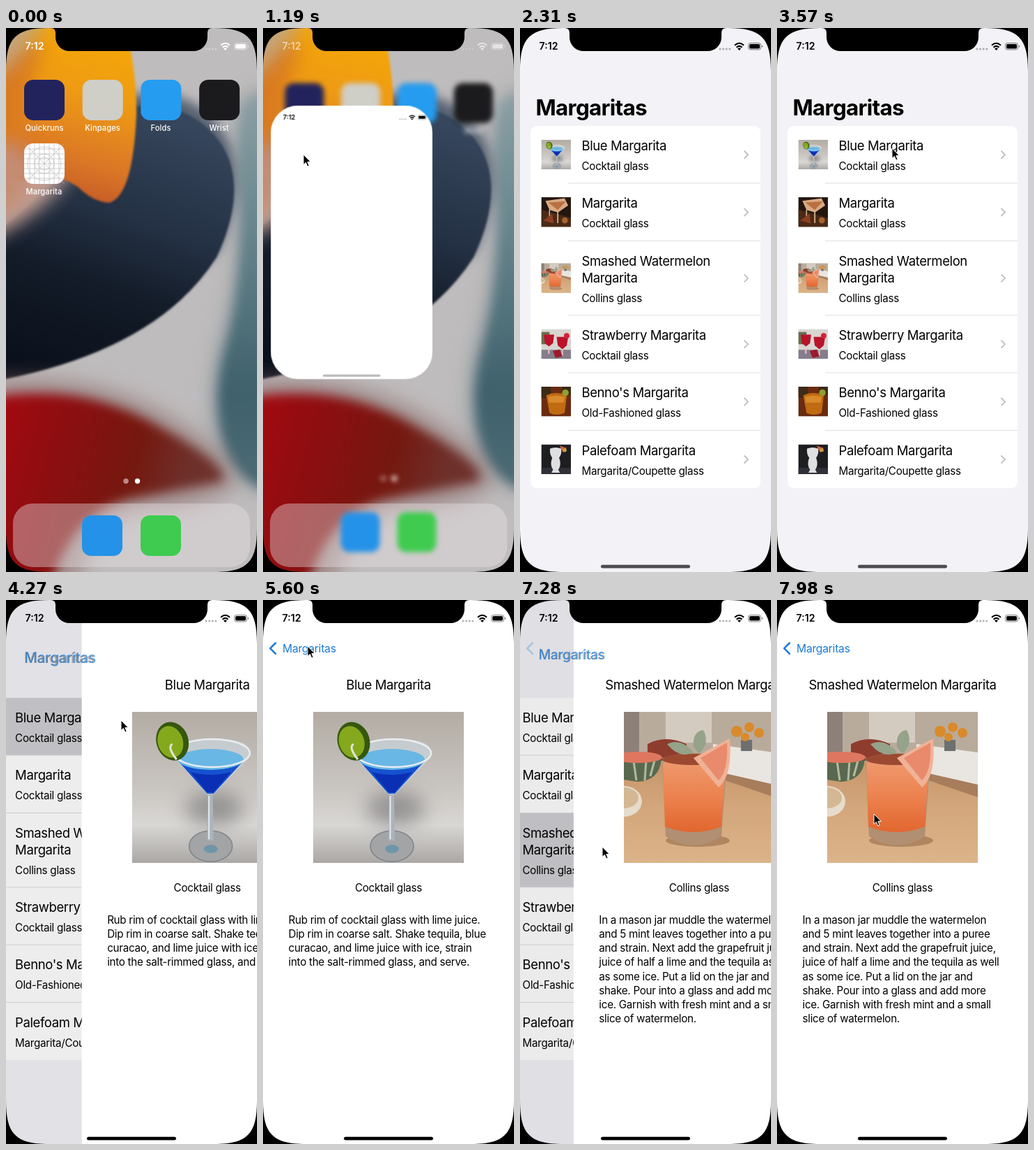
An HTML page for the animation above (8 s loop, 360x778 px).

```html
<!DOCTYPE html>
<html lang="en">
<head>
<meta charset="utf-8">
<title>Cocktail list</title>
<style>
html, body { margin: 0; width: 100%; height: 100%; overflow: hidden; background: #000; }
svg { display: block; width: 360px; height: 778px; }
text { font-family: Inter, "Open Sans", sans-serif; white-space: pre; }
.label { font-size: 11.1px; font-weight: 500; fill: #fff; letter-spacing: .1px; text-anchor: middle; }
.time { font-size: 14.2px; font-weight: 600; }
.big { font-size: 31.4px; font-weight: 700; letter-spacing: -.7px; }
.head { font-size: 18.5px; letter-spacing: -.4px; }
.body { font-size: 15.2px; letter-spacing: -.28px; }
.back { font-size: 15.7px; letter-spacing: -.25px; fill: #1a7bd8; }
.mid { text-anchor: middle; }
.b2 { filter: blur(1.6px); }
.b8 { filter: blur(8px); }
.b14 { filter: blur(14px); }
</style>
</head>
<body>
<svg id="stage" viewBox="0 0 360 778"></svg>
<script>
const drinks = [
  { name: ["Blue Margarita"], glass: "Cocktail glass", y: 140, end: 222,
    steps: ["Rub rim of cocktail glass with lime juice.", "Dip rim in coarse salt. Shake tequila, blue",
      "curacao, and lime juice with ice, strain", "into the salt-rimmed glass, and serve."] },
  { name: ["Margarita"], glass: "Cocktail glass", y: 222, end: 304.5 },
  { name: ["Smashed Watermelon", "Margarita"], glass: "Collins glass", y: 304.5, end: 410.8,
    steps: ["In a mason jar muddle the watermelon", "and 5 mint leaves together into a puree",
      "and strain. Next add the grapefruit juice,", "juice of half a lime and the tequila as well",
      "as some ice. Put a lid on the jar and", "shake. Pour into a glass and add more",
      "ice. Garnish with fresh mint and a small", "slice of watermelon."] },
  { name: ["Strawberry Margarita"], glass: "Cocktail glass", y: 410.8, end: 493 },
  { name: ["Benno's Margarita"], glass: "Old-Fashioned glass", y: 493, end: 575.5 },
  { name: ["Palefoam Margarita"], glass: "Margarita/Coupette glass", y: 575.5, end: 658 }
];

// Simplified pictures on a 216 x 216 square
const photos = [
  `<rect width="216" height="216" fill="url(#grey)"/>
   <ellipse cx="118" cy="138" rx="42" ry="24" fill="#6b6a6c" opacity=".6" class="b14"/>
   <ellipse cx="113" cy="192" rx="31" ry="22" fill="#a3a4a6" stroke="#7f8488" stroke-width="1.5"/>
   <ellipse cx="113" cy="196" rx="10" ry="6" fill="#6f95a8"/>
   <path d="M109 116h7l1 68h-9z" fill="#a9b4bd"/><path d="M110.500 120v62" stroke="#e4e8ea" stroke-width="2"/>
   <path d="M61 62Q60 40 115 39T169 58Q168 66 160 74L117 118h-9L68 74Z" fill="#c9d3da" opacity=".75"/>
   <path d="M66 70Q112 92 160 70L117 117h-9Z" fill="#1552cf"/>
   <path d="M84 86Q112 94 142 86L117 115h-9Z" fill="#0a2fb4"/>
   <ellipse cx="113" cy="68" rx="47" ry="15" fill="#69b7e4"/>
   <ellipse cx="115" cy="59" rx="54" ry="20" fill="none" stroke="#e9edf0" stroke-width="2.500"/>
   <g transform="rotate(-18 58 42)"><ellipse cx="58" cy="42" rx="23" ry="28" fill="#35570f"/>
   <ellipse cx="55" cy="42" rx="18" ry="23" fill="#85a91d"/></g>
   <path d="M64 68Q50 50 58 46" stroke="#dfe6d4" stroke-width="3" fill="none"/>`,
  `<rect width="216" height="216" fill="#24160f"/><path d="M0 90L216 150V216H0Z" fill="#4a2a16"/>
   <path d="M30 26L170 8L196 60L122 110L60 92Z" fill="#d9a983"/><path d="M52 38L180 30L120 92Z" fill="#b9713f"/>
   <path d="M116 100h9v88h-9zM56 90h8v80h-8z" fill="#d8b48c"/><circle cx="172" cy="168" r="22" fill="#a4632a"/>
   <path d="M14 170L80 120L92 190Z" fill="#8a3f22"/>`,
  `<rect width="216" height="216" fill="url(#wood)"/><rect width="216" height="72" fill="#b9ab9b"/>
   <path d="M0 0h22v58H0z" fill="#8d8078"/><path d="M60 0h66v44H60z" fill="#d4cbc0"/>
   <path d="M34 46Q60 32 90 46V70H34Z" fill="#8e3c2e"/>
   <path d="M128 46L216 58V108L128 84Z" fill="#e9e5e0"/><path d="M128 84L216 104V122L128 92Z" fill="#a77d5c"/>
   <path d="M168 40h16v16h-16z" fill="#6d6f70"/>
   <g fill="#d98a2b"><circle cx="162" cy="28" r="8"/><circle cx="180" cy="22" r="7"/><circle cx="194" cy="30" r="7"/><circle cx="174" cy="36" r="6"/></g>
   <path d="M0 66H54Q52 98 20 100L0 97Z" fill="#59684f"/><path d="M14 70l4 28M32 70l-2 28M44 70l-6 22" stroke="#b4bc9d" stroke-width="3"/>
   <ellipse cx="20" cy="65" rx="35" ry="8" fill="#df7760"/>
   <ellipse cx="0" cy="128" rx="26" ry="22" fill="#e6dccb"/><ellipse cx="0" cy="123" rx="21" ry="15" fill="#d3b893"/>
   <ellipse cx="106" cy="184" rx="46" ry="9" fill="#976b49" opacity=".6"/>
   <path d="M55 66Q100 52 148 66L140 178Q100 204 60 178Z" fill="#b18f72"/>
   <path d="M56 72Q102 62 146 72L140 164Q100 180 59 164Z" fill="url(#juice)"/>
   <ellipse cx="101" cy="68" rx="46" ry="8" fill="#9b4a31"/>
   <path d="M152 38Q156 92 136 108L100 66Z" fill="#f0b296"/><path d="M148 44Q150 84 136 98L110 66Z" fill="#e98a6c"/>
   <path d="M62 46Q82 36 100 58Q80 68 62 46ZM100 50Q98 28 114 26Q124 44 108 60Z" fill="#94a38a"/>`,
  `<rect width="216" height="216" fill="#d9d5d0"/><path d="M0 150H216V216H0Z" fill="#857c8c"/><path d="M0 20h60v90H0z" fill="#66714f"/>
   <path d="M18 40h76l-8 62-30 24-30-24zM112 56h84l-10 62-32 28-34-28z" fill="#b9142a"/>
   <path d="M50 124h10v56H50zM148 144h10v50h-10z" fill="#e7c5ca"/><path d="M84 158l50-10 20 50-50 10z" fill="#9c1a2b"/>
   <circle cx="185" cy="48" r="20" fill="#d3233a"/>`,
  `<rect width="216" height="216" fill="#6a2b10"/><path d="M0 0h70v80H0zM150 0h66v60h-66z" fill="#3d2a17"/>
   <path d="M36 62Q110 30 186 62L170 190Q110 216 60 190Z" fill="#c06a13"/><path d="M50 74Q110 56 172 74L164 116H56Z" fill="#d88a2a"/>
   <circle cx="176" cy="44" r="24" fill="#90a02c"/>`,
  `<rect width="216" height="216" fill="#1e1e22"/><path d="M0 170H216V216H0Z" fill="#303038"/>
   <path d="M64 30Q104 14 146 30Q150 74 130 96Q150 150 124 184L136 206H74L86 184Q60 150 80 96Q60 74 64 30Z" fill="#dedfe0"/>
   <path d="M134 10L184 26L160 60Z" fill="#d1683c"/><circle cx="172" cy="42" r="13" fill="#c9a03a"/>`
];

const text = (x, y, cls, s, extra = "") => `<text x="${x}" y="${y}" class="${cls}" ${extra}>${s}</text>`;
const photo = (i, x, y, size) =>
  `<svg x="${x}" y="${y}" width="${size}" height="${size}" viewBox="0 0 216 216">${photos[i]}</svg>`;
const tile = (x, y, fill) => `<rect x="${x}" y="${y}" width="58" height="58" rx="13" fill="${fill}"/>`;

const status = (id, color, dots) => `<g id="${id}" fill="${color}" stroke="none">
  ${text(27.5, 31.3, "time", "7:12")}
  <g opacity="${dots}">${[287, 291.6, 296.2, 300.8].map(x => `<circle cx="${x}" cy="30" r="1.500"/>`).join("")}</g>
  <g fill="none" stroke="${color}" stroke-width="2"><path d="M308 24.800q6.500-6 13 0M310.500 27.700q4-3.600 8 0"/></g>
  <path d="M312 29.500q2.500-2 5 0l-2.500 2.600z"/>
  <rect x="327.500" y="21.500" width="18" height="9.500" rx="3" fill="none" stroke="${color}" opacity=".5"/>
  <rect x="329" y="23" width="15" height="6.500" rx="1.700"/><path d="M347 24.500q1.700 1.700 0 3.500z"/></g>`;

const row = (d, i) => {
  const mid = (d.y + d.end) / 2;
  const lines = d.name.map((s, k) => text(88.5, d.y + 35.4 + 24 * k, "head", s)).join("");
  return `<g id="thumb${i}">${photo(i, 30.5, mid - 21.2, 42.5)}</g>${lines}
    ${text(88.5, d.end - 19.3, "body", d.glass)}
    <path d="M322 ${mid - 4.800}l5 5-5 5" fill="none" stroke="#c3c3c7" stroke-width="2" stroke-linecap="round" stroke-linejoin="round"/>
    ${i < 5 ? `<path d="M69 ${d.end}H345" stroke="#dedee1"/>` : ""}`;
};

const detail = i => `<g id="detail${i}">${text(180, 127.6, "head mid", drinks[i].name.join(" "))}
  ${photo(i, 72, 160, 216)}${text(180, 417.3, "body mid", drinks[i].glass)}
  ${drinks[i].steps.map((s, k) => text(36.5, 462.7 + 20.2 * k, "body", s)).join("")}</g>`;

const gridLines = [8, 15, 22, 29, 36, 43, 50].map(v => `M${v} 0V58M0 ${v}H58`).join("");
const gradient = (id, dir, stops) => `<linearGradient id="${id}" ${dir}>${stops.map(([o, c]) =>
  `<stop offset="${o}" stop-color="${c}"/>`).join("")}</linearGradient>`;
const down = 'x2="0" y2="1"';

stage.innerHTML = `<defs>
  ${gradient("grey", down, [[0, "#b3aca4"], [.5, "#c9c5c1"], [.75, "#d9d7d4"], [1, "#aaa7a5"]])}
  ${gradient("wood", down, [[.3, "#c49468"], [.65, "#d4a77c"], [1, "#dcb48a"]])}
  ${gradient("juice", down, [[0, "#ee9a70"], [.5, "#ec8350"], [1, "#e2662f"]])}
  ${gradient("amber", 'x1=".6" y1="0" x2=".4" y2="1"', [[0, "#f6aa04"], [.4, "#ee9a14"], [.75, "#da7626"], [1, "#bf5526"]])}
  ${gradient("navy", 'x1=".6" y1="0" x2=".3" y2="1"', [[0, "#36465c"], [.4, "#233043"], [.65, "#131b28"], [1, "#0a101b"]])}
  ${gradient("red", 'x2=".9" y2=".2"', [[0, "#a8080f"], [.4, "#8c0e10"], [.75, "#74180f"], [1, "#6e302b"]])}
  ${gradient("teal", down, [[0, "#8ba0a5"], [.35, "#66848c"], [.75, "#3f616c"], [1, "#4c6b75"]])}
  <clipPath id="window"><rect id="pane"/></clipPath>
  <clipPath id="cardShape"><rect x="15" y="140" width="330" height="518" rx="9"/></clipPath></defs>
<rect width="360" height="778" fill="#bfbcbd"/>
<path class="b14" d="M390 80L336 100Q322 180 330 260Q330 370 304 450Q282 530 303 600Q322 655 390 672Z" fill="#7d8f94" opacity=".6"/>
<path class="b8" d="M375 90L342 110Q328 180 337 260Q338 370 316 450Q292 530 314 600Q330 645 375 662Z" fill="url(#teal)"/>
<path class="b8" d="M170 98Q275 78 318 160Q346 225 304 320L200 410L-20 480V270Z" fill="#566070"/>
<path class="b2" d="M185 112Q266 104 310 168Q348 230 302 328Q218 460 -10 504V290Q60 230 185 112Z" fill="url(#navy)"/>
<path class="b14" d="M-30 120L100 190Q75 255 -30 305Z" fill="#c3a298"/>
<path class="b2" d="M-20 -20H168Q188 60 187 125Q182 240 148 250Q124 248 104 228Q70 204 30 218L-20 210Z" fill="url(#amber)"/>
<path class="b14" d="M-30 140Q20 160 48 200Q30 260 -30 280Z" fill="#c48d73"/>
<path class="b14" d="M-40 20L55 20Q34 70 20 150L-40 170Z" fill="#d87a20"/>
<path class="b14" d="M-40 -40H70Q44 20 -10 68L-40 70Z" fill="#c3a57e"/>
<path class="b14" d="M-40 505Q120 485 235 555Q335 612 330 655Q270 692 200 690Q130 700 100 800H-40Z" fill="#8f6e6d" opacity=".6"/>
<path class="b8" d="M-30 530Q110 503 225 573Q320 625 310 648Q245 662 175 674Q110 690 78 760L60 800H-30Z" fill="url(#red)"/>
<rect x="10" y="680" width="340" height="91" rx="28" fill="#e8e2e4" opacity=".4"/>
<g id="home">
  ${[["#22235c", "Quickruns"], ["#cfcec7", "Kinpages"], ["#259cf0", "Folds"], ["#1b1b1d", "Wrist"]].map(([c, s], i) =>
    tile(26 + 83.7 * i, 74, c) + text(55 + 83.5 * i, 147.3, "label", s)).join("")}
  ${tile(26, 165, "#fff")}<g transform="translate(26 165)" fill="none" stroke="#b4b4b6" stroke-width=".6">
    <path d="${gridLines}M0 0L58 58M58 0L0 58"/>${[9, 14, 24].map(r => `<circle cx="29" cy="29" r="${r}"/>`).join("")}</g>
  ${text(54.5, 238.4, "label", "Margarita")}
  <circle cx="172" cy="648" r="3.700" fill="#fff" opacity=".5"/><circle cx="188.500" cy="648" r="3.700" fill="#fff"/>
  ${tile(109, 697, "#2492e8")}${tile(193, 697, "#3fcb4f")}
</g>
${status("homeStatus", "#fff", .3)}
<g id="app" clip-path="url(#window)">
  <rect width="360" height="778" fill="#fff"/>
  <g id="content">
    <g id="list"><rect width="360" height="778" fill="#f2f2f7"/>
      <g clip-path="url(#cardShape)"><rect y="140" width="360" height="518" fill="#fff"/><rect id="picked" width="360" fill="#cfcfd3"/></g>
      ${drinks.map(row).join("")}
      <rect id="dim" width="360" height="778"/></g>
    <g id="page"><rect width="360" height="778" fill="#fff"/>${detail(0)}${detail(2)}</g>
    <g id="title">${text(0, 0, "big", "Margaritas")}</g>
    <g id="back">${text(0, 0, "back", "Margaritas")}</g>
    <path id="arrow" d="M18 61.500L10.300 69.200L18 76.900" fill="none" stroke="#1a7bd8" stroke-width="2.500" stroke-linecap="round" stroke-linejoin="round"/>
  </g>
  ${status("appStatus", "#000", .3)}
  <rect id="bar" x="116" width="128" height="4.800" rx="2.400"/>
</g>
<path d="M0 0H360V778H0ZM62 0C14 0 0 14 0 62V716C0 764 14 778 62 778H298C346 778 360 764 360 716V62C360 14 346 0 298 0Z" fill-rule="evenodd"/>
<path d="M64 0Q71 0 71 7V13A20 20 0 0 0 91 33H269A20 20 0 0 0 289 13V7Q289 0 296 0Z"/>
<path id="cursor" d="M0 0V14.500L3.400 11.400L5.800 17L8.200 16L5.800 10.600H10.300Z" stroke="#fff" stroke-width="1"/>`;

const el = id => document.getElementById(id);
const set = (id, attrs) => { for (const k in attrs) el(id).setAttribute(k, attrs[k]); };
const clamp = v => Math.min(1, Math.max(0, v));
const lerp = (a, b, p) => a + (b - a) * p;

// Critically damped spring, time in ms
const spring = t => {
  const s = Math.max(0, t) * .017, p = 1 - (1 + s) * Math.exp(-s);
  return p > .992 ? 1 : p;
};

// [time, x, y]; an entry without a position hides the pointer
const path = [[0], [70, 298, 715], [770, 58, 181], [1820, 58, 181], [2290, 333, 6], [2300],
  [2800, 324, 241], [3570, 165, 172], [4970, 165, 172], [5600, 64, 66], [6090, 64, 66],
  [6370, 112, 260], [6720, 118, 353], [7870, 118, 353], [7980, 139, 306], [8000, 139, 306]];

function movePointer(t) {
  const i = path.findIndex(k => k[0] > t), a = path[i - 1], b = path[i];
  const shown = a.length > 1;
  set("cursor", { opacity: +shown });
  if (!shown || b.length < 2) return;
  const u = (t - a[0]) / (b[0] - a[0]), p = u * u * (3 - 2 * u);
  set("cursor", { transform: `translate(${lerp(a[1], b[1], p)} ${lerp(a[2], b[2], p)})` });
}

function openApp(t) {
  const q = spring(t - 1077), w = lerp(58, 360, q), h = lerp(58, 778, q ** 1.4), s = w / 360;
  const x = lerp(55, 180, q) - w / 2, y = lerp(194, 389, q) - h / 2;
  set("app", { transform: `translate(${x} ${y}) scale(${s})`, opacity: clamp(q * 5) });
  set("pane", { width: 360, height: h / s, rx: lerp(13, 44, q ** .3) / s });
  set("bar", { y: h / s - 10.2, fill: t < 1400 ? "#bbb" : t < 3990 ? "#4c4c4e" : "#000" });
  set("home", { transform: `translate(180 389) scale(${1 - .06 * q} ${1 - .026 * q}) translate(-180 -389)` });
  el("home").style.filter = q > 0 && q < 1 ? `blur(${7 * q}px)` : "none";
  set("homeStatus", { opacity: 1 - .7 * q });
  set("content", { opacity: clamp((t - 1540) / 140) });
  drinks.forEach((d, i) => set("thumb" + i, { opacity: +(t >= 1890 + 70 * i) }));
}

function navigate(t) {
  const p = t < 5950 ? spring(t - 4128) : t < 6950 ? 1 - spring(t - 5955) : spring(t - 7110);
  const second = t >= 6950, d = drinks[second ? 2 : 0];
  const pressed = t >= 3990 && t < 5950 || t >= 7000;
  set("list", { transform: `translate(${-108 * p})` });
  set("dim", { opacity: .1 * p });
  set("picked", { y: d.y, height: d.end - d.y, opacity: pressed ? 1 : p });
  set("page", { transform: `translate(${360 * (1 - p)})` });
  set("detail0", { opacity: +!second });
  set("detail2", { opacity: +second });
  const at = `translate(${lerp(22.5, 28, p)} ${lerp(124.6, 74.8, p)})`;
  set("title", { transform: `${at} scale(${lerp(1, .472, p)})`, opacity: 1 - p });
  set("back", { transform: `${at} scale(${lerp(2.117, 1, p)})`, opacity: p });
  set("arrow", { opacity: clamp((p - .7) / .3) });
}

const start = performance.now();
function draw() {
  const t = (performance.now() - start) % 8000;
  openApp(t);
  navigate(t);
  movePointer(t);
  requestAnimationFrame(draw);
}
draw();
</script>
</body>
</html>
```
